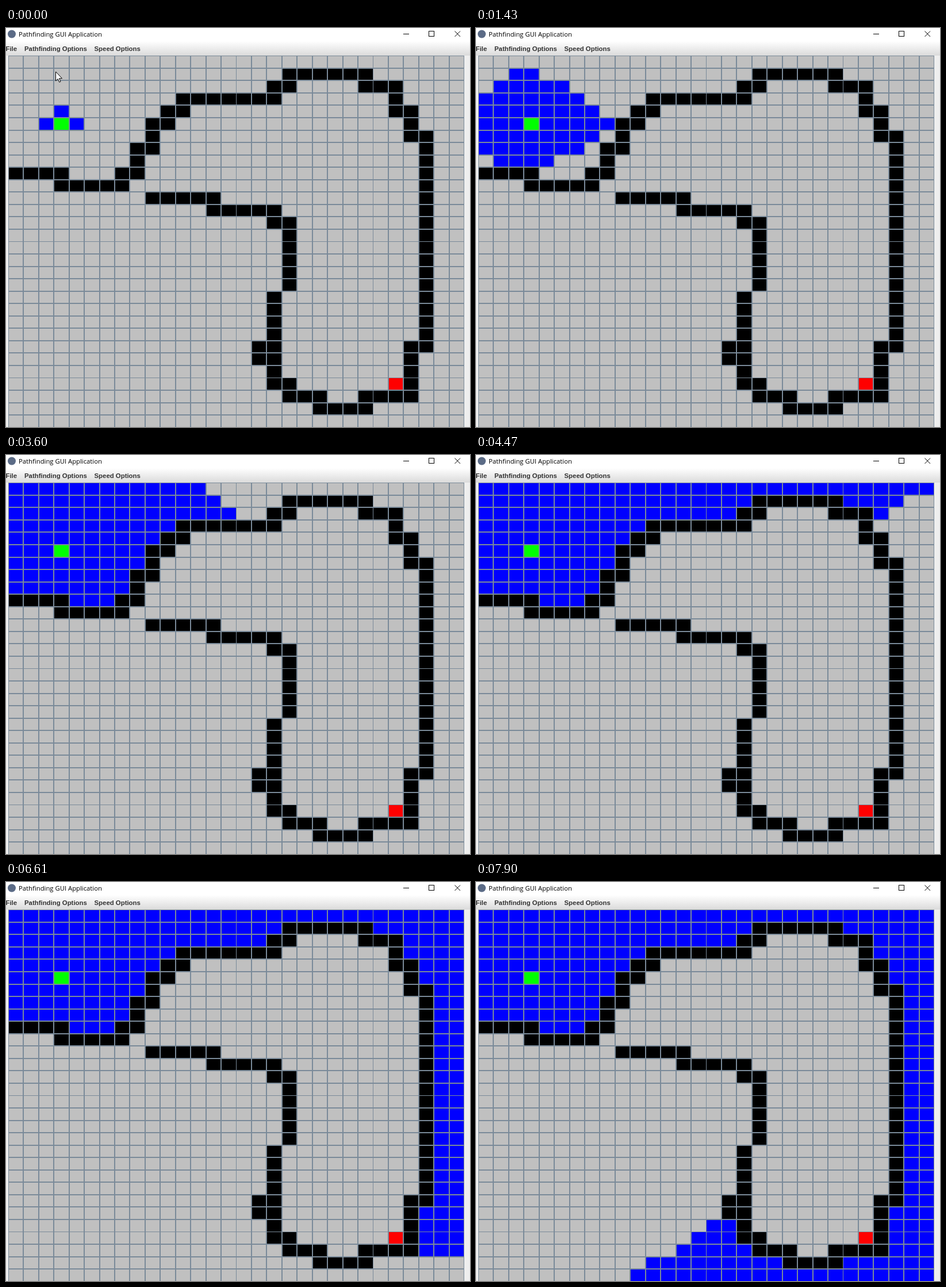
Animation, 807 px wide and 694 px high, one loop 7990 ms. Source, as an HTML page:

```html
<!DOCTYPE html>
<html lang="en">
<head>
<meta charset="utf-8">
<title>Pathfinding GUI Application</title>
<style>
  html, body { margin: 0; width: 100%; height: 100%; overflow: hidden; background: #eee; }
  svg { display: block; }
  .title { font: 11.3px "Open Sans", "Noto Sans", sans-serif; fill: #000; }
  .menu { font: bold 11.4px "Liberation Sans", Arial, sans-serif; fill: #333; }
  .free { fill: #c0c0c0; }
  .wall { fill: #000; }
  .start { fill: #0f0; }
  .goal { fill: #f00; }
  .seen { fill: #00f; }
  #cursor { animation: leave 7990ms step-end infinite; }
  @keyframes leave { 0.87% { visibility: hidden; } 100% { visibility: hidden; } }
</style>
</head>
<body>
<svg width="807" height="694" viewBox="0 0 807 694">
  <defs>
    <linearGradient id="bar" x2="0" y2="1">
      <stop offset="0" stop-color="#fff"/>
      <stop offset="1" stop-color="#dadada"/>
    </linearGradient>
  </defs>
  <rect width="807" height="694" fill="#eee"/>
  <rect width="807" height="23" fill="#fff"/>
  <rect y="23" width="807" height="25" fill="url(#bar)"/>
  <circle cx="10" cy="10.5" r="7" fill="#5b6b86"/>
  <text class="title" x="22" y="15">Pathfinding GUI Application</text>
  <g fill="none" stroke="#000">
    <path d="M691 10.5h10M735.5 5.5h9v9h-9z" shape-rendering="crispEdges"/>
    <path d="M780.5 5.5l9.5 9.5M790 5.5l-9.5 9.5"/>
  </g>
  <text class="menu" x="-0.5" y="40">File</text>
  <text class="menu" x="32" y="40">Pathfinding Options</text>
  <text class="menu" x="153.5" y="40">Speed Options</text>
  <rect x="4" y="48" width="793" height="647" fill="#7a8a99"/>
  <g id="grid" shape-rendering="crispEdges"></g>
  <path id="cursor" d="M86.5 76v16l3.7-3.5 2.5 5.7 2.3-1-2.5-5.5h5z" fill="#fff" stroke="#000"/>
</svg>
<script>
const SIZE = 30, LOOP = 7990;
const START = [3, 5], GOAL = [25, 26];

// Walls as strokes of a pen over the cells, in SVG path style
const WALLS =
  "M0 9H3V10H7V9H8V7H9V5H10V4H11V3H17V2H18V1H23V2H25V4H26V6H27V23H26V27H23V28H20V27H18V26" +
  "H17V24H16V23H17V19M18 18V13H17V12H13V11H9";

// Key points of the search pace: time in ms, cells visited
const PACE = [[0, 3], [1660, 57], [2980, 80], [4470, 127], [6610, 190], [LOOP, 239]];

const grid = document.getElementById("grid");
const lineX = col => 3.87 + col * 26.443;
const lineY = row => 48.29 + row * 21.546;
const indexOf = (col, row) => row * SIZE + col;

// Pixels between two neighbouring grid lines
function span(line, i) {
  const half = 0.98, from = Math.round(line(i) + half);
  return [from, Math.round(line(i + 1) - half) - from];
}

function addCell(col, row) {
  const rect = document.createElementNS(grid.namespaceURI, "rect");
  const [x, width] = span(lineX, col), [y, height] = span(lineY, row);
  for (const [name, value] of Object.entries({ x, y, width, height, class: "free" }))
    rect.setAttribute(name, value);
  return grid.appendChild(rect);
}

const cells = Array.from({ length: SIZE * SIZE },
  (_, i) => addCell(i % SIZE, Math.floor(i / SIZE)));
const paint = (i, kind) => cells[i].setAttribute("class", kind);

function cellsAlong(path) {
  const found = new Set();
  let col, row;
  for (const [, command, a, b] of path.matchAll(/([MHV])(\d+)(?: (\d+))?/g)) {
    if (command === "M") [col, row] = [+a, +b];
    const endCol = command === "H" ? +a : col, endRow = command === "V" ? +a : row;
    found.add(indexOf(col, row));
    while (col !== endCol || row !== endRow) {
      col += Math.sign(endCol - col);
      row += Math.sign(endRow - row);
      found.add(indexOf(col, row));
    }
  }
  return found;
}

// Breadth-first search: left, right, up, down
function visitOrder(blocked) {
  const queue = [START], known = new Set(blocked).add(indexOf(...START));
  for (const [col, row] of queue)
    for (const [dx, dy] of [[-1, 0], [1, 0], [0, -1], [0, 1]]) {
      const c = col + dx, r = row + dy, i = indexOf(c, r);
      if (c < 0 || r < 0 || c >= SIZE || r >= SIZE || known.has(i)) continue;
      known.add(i);
      queue.push([c, r]);
    }
  return queue.slice(1).map(cell => indexOf(...cell));
}

function visitedAt(time) {
  const next = PACE.findIndex(([t]) => t > time);
  const [t0, n0] = PACE[next - 1], [t1, n1] = PACE[next];
  return Math.floor(n0 + (time - t0) / (t1 - t0) * (n1 - n0));
}

const walls = cellsAlong(WALLS);
walls.forEach(i => paint(i, "wall"));
paint(indexOf(...START), "start");
paint(indexOf(...GOAL), "goal");

const order = visitOrder(walls);
let shown = 0;

function showVisited(count) {
  for (; shown < count; shown++) paint(order[shown], "seen");
  while (shown > count) paint(order[--shown], "free");
}

const begin = performance.now();
function tick() {
  showVisited(visitedAt((performance.now() - begin) % LOOP));
  requestAnimationFrame(tick);
}
tick();
</script>
</body>
</html>
```
